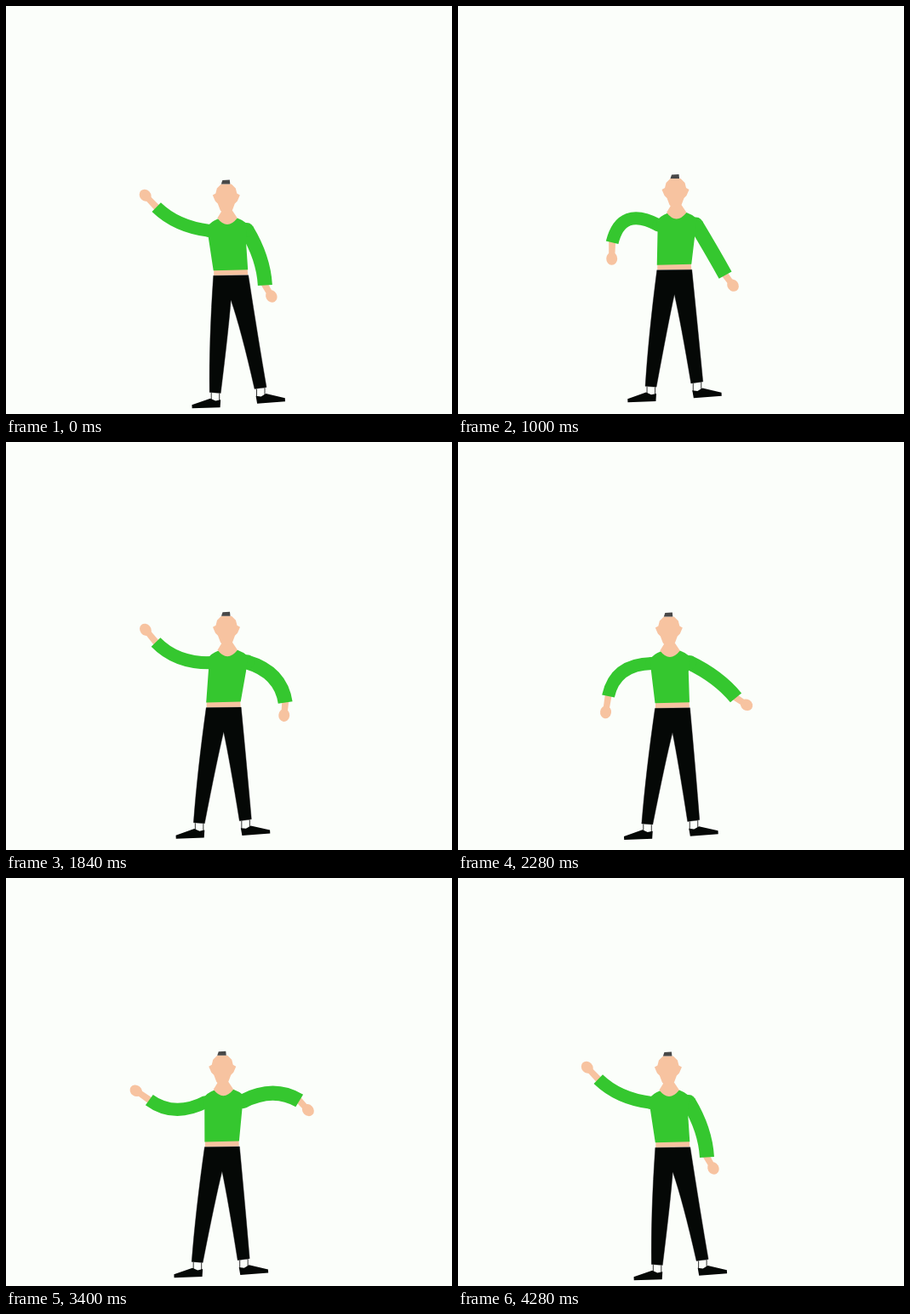
Recreate the animation shown at these times as an HTML page with a canvas. Size 524 px wide and 480 px high, loop 4380 ms.

```html
<!DOCTYPE html>
<html lang="en">
<head>
<meta charset="utf-8">
<title>Dancing figure</title>
<style>
html, body { margin: 0; width: 100%; height: 100%; overflow: hidden; background: #fbfefa; }
canvas { display: block; }
</style>
</head>
<body>
<canvas id="stage" width="524" height="480"></canvas>
<script>
const ctx = document.getElementById('stage').getContext('2d');
const LOOP = 4380, TICK = 40, STEP = 1000 / 18, LAST = 77;
const BEAT = LAST * STEP / 3; // three dance cycles per loop
const TURN = 2 * Math.PI;
const SKIN = '#f7c3a0', GREEN = '#35c72f', BLACK = '#050806', WHITE = '#fbfefa';

// Smooth pulse around a point of the cycle
function bump(phase, center, width) {
  const d = phase - center;
  return Math.exp(-(((d - Math.round(d)) / width) ** 2));
}

function shape(color, x, y, points) {
  ctx.fillStyle = color;
  ctx.beginPath();
  points.forEach(([px, py]) => ctx.lineTo(x + px, y + py));
  ctx.closePath();
  ctx.fill();
}

// Curve from one point to another, passing through the middle one
function through(x0, y0, mx, my, x1, y1) {
  ctx.quadraticCurveTo(2 * mx - (x0 + x1) / 2, 2 * my - (y0 + y1) / 2, x1, y1);
}

// Angles in degrees: 0 hangs down, 90 points sideways away from the body
function arm(side, x, y, upper, lower, hand, width, reach) {
  const go = (px, py, degrees, length) => {
    const a = degrees * TURN / 360;
    return [px + side * length * Math.sin(a), py + length * Math.cos(a)];
  };
  const elbow = go(x, y, upper, 36);
  const cuff = go(...elbow, lower, 33);

  ctx.save();
  ctx.translate(...cuff);
  ctx.scale(side, 1);
  ctx.rotate(-hand * TURN / 360);
  shape(SKIN, 0, 0, [[-4, -4], [4, -4], [3.5, reach], [-3.5, reach]]);
  ctx.beginPath();
  ctx.ellipse(0, reach, 6.5, 7.5, 0, 0, TURN);
  ctx.fill();
  ctx.restore();

  ctx.strokeStyle = ctx.fillStyle = GREEN;
  ctx.lineWidth = width;
  ctx.beginPath();
  ctx.moveTo(x, y);
  through(x, y, ...elbow, ...cuff);
  ctx.stroke();
  ctx.beginPath();
  ctx.arc(x, y, width / 2, 0, TURN);
  ctx.fill();
}

function foot(side, x, y) {
  shape('#333', x, y, [[-5, -1], [5.5, -1], [5.5, 11], [-5, 11]]);
  shape(WHITE, x, y, [[-4, 0], [4.5, 0], [4.5, 11], [-4, 11]]);
  ctx.save();
  ctx.translate(x, y);
  ctx.scale(side, 1);
  ctx.rotate(side < 0 ? 0.05 : -0.06);
  shape(BLACK, 0, 0, [[-6, 9], [0, 10], [6, 7], [28, 13.5], [28, 17.5], [-5, 18]]);
  ctx.restore();
}

function trousers(wx, wy, lx, ly, rx, ry) {
  const kl = (wx + lx) / 2 - 5, kly = (wy + ly) / 2 + 4;
  const kr = (wx + rx) / 2 + 5, kry = (wy + ry) / 2 + 6;
  const crotch = [wx, wy + 29];
  ctx.beginPath();
  ctx.moveTo(wx - 20.5, wy + 0.5);
  through(wx - 20.5, wy, kl - 10, kly, lx - 6.5, ly);
  ctx.lineTo(lx + 6.5, ly + 1);
  through(lx + 6.5, ly + 1, kl + 10, kly, ...crotch);
  through(...crotch, kr - 9.5, kry, rx - 7, ry + 1);
  ctx.lineTo(rx + 7, ry - 1);
  through(rx + 7, ry - 1, kr + 9.5, kry, wx + 20.5, wy);
  ctx.closePath();
  ctx.strokeStyle = '#999';
  ctx.lineWidth = 1;
  ctx.stroke();
  ctx.fillStyle = BLACK;
  ctx.fill();
}

function shirt(nx, ny, wx, wy) {
  ctx.fillStyle = GREEN;
  ctx.beginPath();
  ctx.moveTo(nx - 11, ny);
  ctx.quadraticCurveTo(nx - 19, ny + 3, nx - 23, ny + 9);
  ctx.lineTo(nx - 22, ny + 22);
  ctx.lineTo(wx - 20.5, wy - 5.5);
  ctx.lineTo(wx + 20, wy - 6.5);
  ctx.lineTo(nx + 22, ny + 24);
  ctx.lineTo(nx + 24, ny + 6);
  ctx.quadraticCurveTo(nx + 18, ny + 1, nx + 12, ny - 1);
  ctx.fill();
}

function head(x, y) {
  const half = [[6, -15], [11, -10], [12.5, -4], [16, -2], [13, 5], [10, 8], [7, 16], [4, 19]];
  const mirrored = half.map(([px, py]) => [-px, py]).reverse();
  ctx.fillStyle = SKIN;
  ctx.beginPath();
  ctx.moveTo(x - 10.5, y + 25);
  ctx.quadraticCurveTo(x + 1, y + 40, x + 13, y + 25);
  ctx.lineTo(x + 7, y + 16);
  ctx.lineTo(x - 5, y + 16);
  ctx.fill();
  shape(SKIN, x, y, [...half, ...mirrored]);
  shape('#484848', x, y, [[-6, -15], [-4.5, -19.5], [4, -20], [4.5, -15]]);
}

function draw(t) {
  const p = t / BEAT % 1;
  const drift = -12 * (1 - Math.exp(-t / 900));
  const sway = Math.sin(TURN * p);
  const step = bump(p, 0.92, 0.17);

  const hx = 263 + drift + 2 * sway + 4.5 * Math.cos(2 * TURN * (p - 0.28));
  const hy = 221.5 + 3.6 * Math.cos(2 * TURN * (p - 0.95));
  const wx = 264.2 + drift + 2 * sway, wy = hy + 92.3;
  const nx = hx + 1, ny = hy + 26;
  const lx = 234.5 + drift + 14 * step + 2.7 * sway;
  const ly = hy + 229 + 1.3 * Math.cos(TURN * (p - 0.9));
  const rx = 289 + drift + 12.5 * step + 2.7 * sway, ry = hy + 225;

  ctx.fillStyle = WHITE;
  ctx.fillRect(0, 0, 524, 480);
  foot(-1, lx, ly);
  foot(1, rx, ry);
  shape(SKIN, wx, wy, [[-20, -8], [19.5, -8], [20, 1], [-20, 1]]);
  trousers(wx, wy, lx, ly, rx, ry);

  // Each joint follows the one above it a little later
  arm(-1, nx - 21, ny + 14,
    105 - 62 * bump(p, 0.49, 0.13),
    128 - 102 * bump(p, 0.64, 0.2),
    145 - 150 * bump(p, 0.66, 0.2), 15, 19);
  arm(1, nx + 23, ny + 13,
    25 + 95 * bump(p, 0.44, 0.155),
    6 + 100 * bump(p, 0.46, 0.135) + 30 * bump(p, 0.8, 0.15),
    30 - 50 * bump(p, 0.24, 0.1) + 40 * bump(p, 0.5, 0.15), 17, 15);

  shirt(nx, ny, wx, wy);
  head(hx, hy);
}

const start = performance.now();
function frame() {
  const t = Math.floor((performance.now() - start) % LOOP / TICK) * TICK;
  draw(Math.min(LAST, Math.floor(t / STEP + 1e-6)) * STEP);
  requestAnimationFrame(frame);
}
frame();
</script>
</body>
</html>
```
